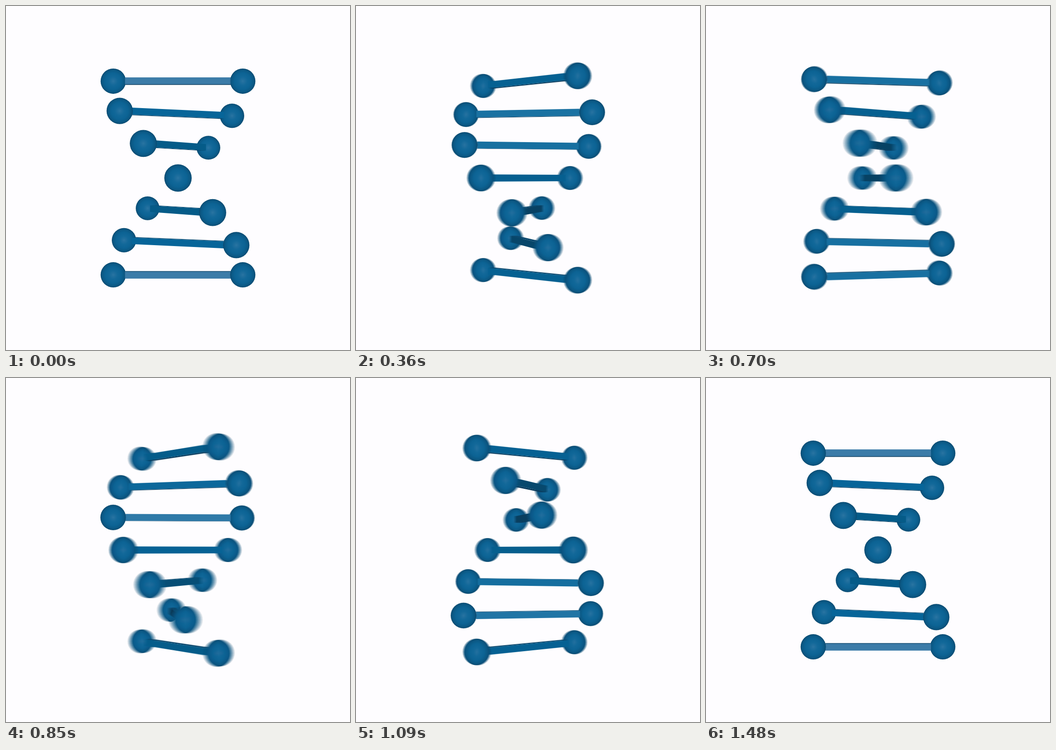
An HTML page with a canvas that plays this animation: 748x748 px, repeating every 1.51 s.

```html
<!DOCTYPE html>
<html lang="en">
<head>
<meta charset="utf-8">
<title>Turning helix</title>
<style>
  html, body { margin: 0; width: 100%; height: 100%; overflow: hidden; background: #fefdff; }
  canvas { display: block; width: 748px; height: 748px; }
</style>
</head>
<body>
<canvas id="stage" width="748" height="748"></canvas>
<script>
const SIZE = 748, MID = 374, LOOP = 1510, BG = '#fefdff';
const ROWS = 7, ROW_GAP = 70.2, TWIST = 30;
const ARM = 140.8, BALL = 27.5, ROD = 7.4, CAMERA = 1855;
const SHUTTER = 0.5, SAMPLES = 14;
const RAD = Math.PI / 180;

// Turn of the helix: [step, degrees, degrees per step]
const TURN = [
  [0, 0, 0], [7, 15, 4.2], [16, 78.6, 10.5], [23, 165, 14],
  [32, 282.2, 10.8], [41, 347, 3.9], [48.5, 360, 0]
];

// Rod side colour by how squarely it faces the viewer
const SIDE = [
  [0, 14, 50, 76], [0.26, 8, 70, 106], [0.5, 5, 91, 136], [0.866, 7, 101, 153],
  [0.966, 26, 114, 162], [0.985, 42, 122, 170], [1, 60, 124, 168]
];

const view = document.getElementById('stage').getContext('2d');
const layer = document.createElement('canvas');
layer.width = layer.height = SIZE;
const g = layer.getContext('2d');

const ballFill = g.createRadialGradient(0, 0, 0, 0, 0, 1);
[[0, '#2a75a2'], [0.12, '#216f9e'], [0.35, '#126899'], [0.65, '#0c6394'],
 [0.88, '#0b5884'], [0.97, '#0a4e76'], [1, '#0a466b']]
  .forEach(([at, color]) => ballFill.addColorStop(at, color));

function segment(list, x) {
  let i = 0;
  while (i < list.length - 2 && x > list[i + 1][0]) i++;
  const a = list[i], b = list[i + 1];
  return [a, b, Math.min(1, Math.max(0, (x - a[0]) / (b[0] - a[0])))];
}

function turnAt(step) {
  const [a, b, u] = segment(TURN, step);
  const w = b[0] - a[0], v = 1 - u;
  return a[1] * v * v * (1 + 2 * u) + b[1] * u * u * (3 - 2 * u)
    + w * u * v * (a[2] * v - b[2] * u);
}

function sideColor(facing) {
  const [a, b, u] = segment(SIDE, facing);
  const mix = k => Math.round(a[k] + (b[k] - a[k]) * u);
  return `rgb(${mix(1)},${mix(2)},${mix(3)})`;
}

function project(x, y, z) {
  const s = CAMERA / (CAMERA - z);
  return [MID + x * s, MID + y * s, s];
}

function face(points, color) {
  g.beginPath();
  points.forEach(p => {
    const [x, y] = project(...p);
    g.lineTo(x, y);
  });
  g.closePath();
  g.fillStyle = color;
  g.fill();
}

function drawBall(x, y, z) {
  const [px, py, s] = project(x, y, z);
  g.save();
  g.translate(px, py);
  g.scale(BALL * s, BALL * s);
  g.beginPath();
  g.arc(0, 0, 1, 0, 7);
  g.fillStyle = ballFill;
  g.fill();
  g.restore();
}

function drawRod(y, angle) {
  const dx = -Math.cos(angle), dz = Math.sin(angle);
  const facing = Math.abs(dx);
  const sign = dx < 0 ? 1 : -1;
  const nx = dz * sign, nz = facing;
  const len = ARM - Math.sqrt(BALL * BALL - 1.5 * ROD * ROD);
  const at = (along, out, dy) =>
    [dx * along + nx * out, y + dy, dz * along + nz * out];

  if (Math.abs(y) > ROD) {
    const dy = y < 0 ? ROD : -ROD;
    face([at(-len, -ROD, dy), at(len, -ROD, dy), at(len, ROD, dy), at(-len, ROD, dy)],
      y < 0 ? '#0a3d5f' : '#0c496f');
  }
  face([at(-len, ROD, -ROD), at(len, ROD, -ROD), at(len, ROD, ROD), at(-len, ROD, ROD)],
    sideColor(facing));
}

function drawHelix(turn) {
  g.fillStyle = BG;
  g.fillRect(0, 0, SIZE, SIZE);
  const parts = [];
  for (let i = 0; i < ROWS; i++) {
    const angle = (TWIST * i - turn) * RAD;
    const x = -ARM * Math.cos(angle), z = ARM * Math.sin(angle);
    const y = (i - (ROWS - 1) / 2) * ROW_GAP;
    parts.push(
      { z, draw: () => drawBall(x, y, z) },
      { z: -z, draw: () => drawBall(-x, y, -z) },
      { z: 0, draw: () => drawRod(y, angle) }
    );
  }
  parts.sort((a, b) => a.z - b.z).forEach(p => p.draw());
}

// Average several moments around the step for motion blur
function render(step) {
  for (let i = 0; i < SAMPLES; i++) {
    const shift = ((i + 0.5) / SAMPLES - 0.5) * SHUTTER;
    drawHelix(turnAt(step + shift));
    view.globalAlpha = 1 / (i + 1);
    view.drawImage(layer, 0, 0);
  }
}

// Steps last 30 ms, except one that lasts 40 ms
function stepAt(ms) {
  return ms < 520 ? Math.min(16, Math.floor(ms / 30)) : Math.floor((ms - 10) / 30);
}

let shown = -1;
const start = performance.now();

function tick() {
  const step = stepAt((performance.now() - start) % LOOP);
  if (step !== shown) render(shown = step);
  requestAnimationFrame(tick);
}
tick();
</script>
</body>
</html>
```
